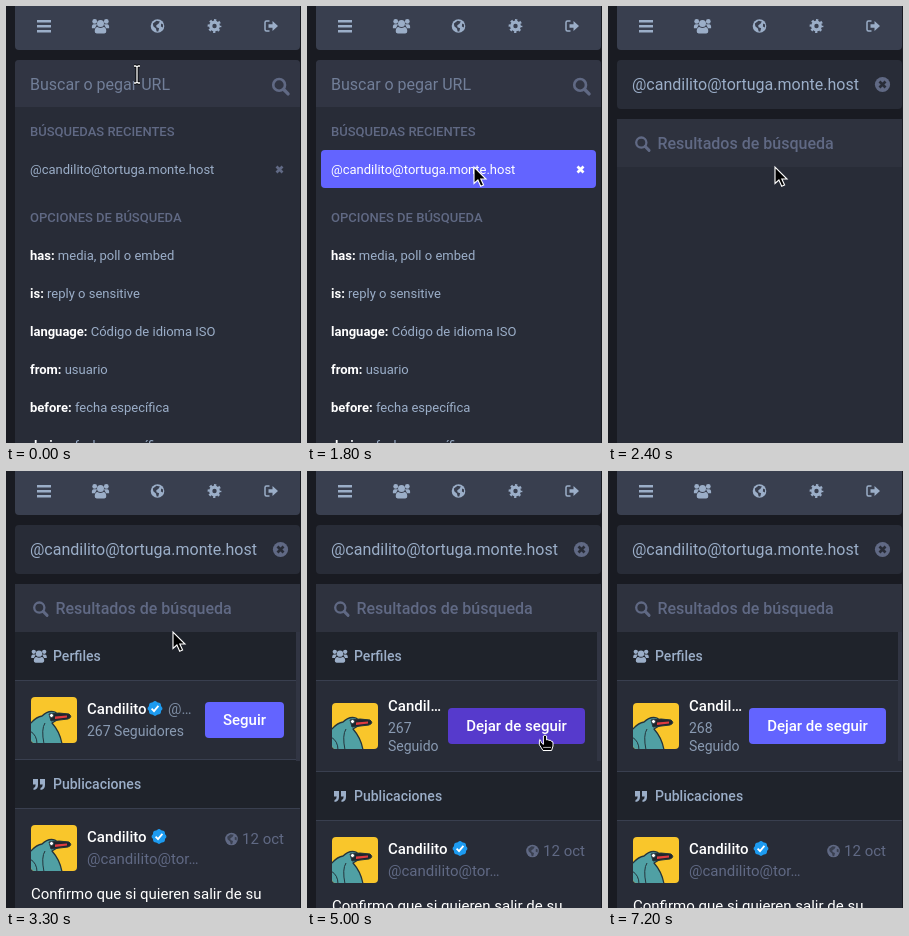
An HTML page for the animation above (7400 ms loop, 295 by 437 pixels).

```html
<!DOCTYPE html>
<html lang="es">
<head>
<meta charset="utf-8">
<title>Búsqueda</title>
<style>
html, body { margin: 0; height: 100%; overflow: hidden; background: #191b22; }
svg { display: block; width: 100vw; height: 100vh; font: 15px Roboto, sans-serif; }
text { white-space: pre; fill: currentColor; }
use { fill: currentColor; stroke: none; }
.line { fill: none; stroke: currentColor; }
.soft { color: #9baec8; }
.dim { color: #606984; }
.white { color: #fff; }
.s13 { font-size: 13px; }
.s14 { font-size: 14px; }
.s16 { font-size: 16px; }
.mid { font-weight: 500; }
.bold { font-weight: 700; fill: #fff; }
.center { text-anchor: middle; }
</style>
</head>
<body>
<svg viewBox="0 0 295 437">
  <defs>
    <g id="users">
      <circle cx="-5.8" cy="-4.6" r="2.4"/><circle cx="5.8" cy="-4.6" r="2.4"/>
      <path d="M-8.6 2.2Q-9-1.8-6.6-1.8H-3.4L-5.6 2.2ZM8.6 2.2Q9-1.8 6.6-1.8H3.4L5.6 2.2Z"/>
      <circle cy="-2.6" r="3.5"/>
      <path d="M-3.8 7.4Q-6 7.4-5.8 5Q-5.5 1-3 1Q0 2.8 3 1Q5.5 1 5.8 5Q6 7.4 3.8 7.4Z"/>
    </g>
    <g id="globe">
      <circle r="6.8"/>
      <path class="hole" d="M-1-5.2L2.4-4.6 1-2.2-1.2-.8-1 1.2 1.6 2.2.8 5.4-.8 5.6-1.6 2.6-4.2.2-4.6-2.4ZM3.6-2.4L5.6-1.6 5.4 1.6 3.4.6Z"/>
    </g>
    <g id="glass">
      <circle class="line" cx="-1.2" cy="-1.4" r="5.1" stroke-width="2.3"/>
      <path class="line" d="M2.6 2.4L6.6 6.4" stroke-width="2.9" stroke-linecap="round"/>
    </g>
    <g id="cross"><path class="line" d="M-3-3L3 3M3-3L-3 3" stroke-width="2.7"/></g>
    <g id="badge">
      <g fill="#1d9bf0"><rect x="-6" y="-6" width="12" height="12" rx="3"/><rect x="-6" y="-6" width="12" height="12" rx="3" transform="rotate(45)"/></g>
      <path d="M-3.4.2L-1 2.6 3.4-2.6" fill="none" stroke="#fff" stroke-width="1.8"/>
    </g>
    <clipPath id="round"><rect width="46" height="46" rx="4"/></clipPath>
    <g id="avatar" clip-path="url(#round)">
      <rect width="46" height="46" fill="#f9c62b"/>
      <g stroke="#24343c" stroke-linejoin="round">
        <path d="M-1 27Q5 20 11 19Q17 13 24 15Q29 18 26 23L21 26Q29 35 31 47H-1Z" fill="#50a0a4" stroke-width="1.3"/>
        <path d="M14 26Q10 32 13 47M-1 34Q6 38 6 47" fill="none"/>
        <path d="M18 17Q28 15 38 17Q42 20 37 22L20 24Z" fill="#20262c"/>
        <path d="M24 19.5L36 18.5V20.5L24 22Z" fill="#df3b3f" stroke="none"/>
        <circle cx="20.5" cy="18.5" r="2" fill="#fff" stroke-width=".8"/>
      </g>
    </g>
    <clipPath id="drawer"><rect x="9" y="113" width="285" height="324"/></clipPath>
    <clipPath id="count"><rect x="81" y="245" width="50.5" height="45"/></clipPath>
    <g id="arrow" fill="#000" stroke="#fff" stroke-width="1.1"><path d="M0 0V16.5L3.9 13 6.7 19.3 9.6 18 6.8 12H12Z"/></g>
    <g id="beam" fill="none">
      <path id="bar" d="M-3-8H-1.2L0-7 1.2-8H3M0-7V8M-3 9H-1.2L0 8 1.2 9H3" stroke="#000" stroke-width="3"/>
      <use href="#bar" style="stroke:none"/>
      <path d="M-3-8H-1.2L0-7 1.2-8H3M0-7V8M-3 9H-1.2L0 8 1.2 9H3" stroke="#fff" stroke-width="1.3"/>
    </g>
    <g id="hand" fill="#000" stroke="#fff" stroke-width="1">
      <path d="M-1.6 1Q0-1 1.6 1V5Q3 4 4 5.4Q5.6 4.6 6.2 6.2Q8 5.8 8 8V11L6.6 15.5H-2L-5.6 9.8Q-6-.2-3.4 8L-1.6 9.4Z"/>
      <path d="M-1.8 12.4H6" stroke-width=".7"/>
    </g>
  </defs>
  <style>
    .hole { fill: #393f4f; }
    #date .hole { fill: #282c37; }
    #beam use { display: none; }
  </style>

  <rect width="295" height="437" fill="#191b22"/>
  <path d="M9 0H294V40Q294 44 290 44H13Q9 44 9 40Z" fill="#393f4f"/>
  <g class="soft">
    <path class="line" d="M31 15.2H45M31 20.2H45M31 25.2H45" stroke-width="2.4"/>
    <use href="#users" x="94.5" y="20"/>
    <use href="#globe" x="151.5" y="20"/>
    <g class="line" transform="translate(208.5 20)">
      <circle r="3.8" stroke-width="3.2"/><circle r="5.8" stroke-width="2.2" stroke-dasharray="2.278" stroke-dashoffset="1.139"/>
    </g>
    <path class="line" d="M263.5 15H260.5Q259 15 259 16.5V23.5Q259 25 260.5 25H263.5" stroke-width="1.5"/>
    <path d="M262.5 18.3H266.5V15L272 20 266.5 25V21.7H262.5Z" fill="currentColor"/>
  </g>

  <g id="popout">
    <rect x="9" y="54" width="285" height="390" rx="4" fill="#282c37"/>
    <path d="M9 101V58Q9 54 13 54H290Q294 54 294 58V101Z" fill="#313543"/>
    <text class="s16" x="24" y="84" style="fill:#717e98">Buscar o pegar URL</text>
    <rect id="caret" x="24" y="69" width="1" height="19" fill="#9baec8"/>
    <use class="dim" href="#glass" transform="translate(274.5 80.5) scale(1.15)"/>
    <g class="dim s13 mid">
      <text x="24" y="130">BÚSQUEDAS RECIENTES</text>
      <text x="24" y="216">OPCIONES DE BÚSQUEDA</text>
    </g>
    <rect id="hover" x="14" y="144" width="275" height="38" rx="4" fill="#6364ff"/>
    <g id="recent">
      <text class="s13" x="24" y="168">@candilito@tortuga.monte.host</text>
      <use id="remove" href="#cross" x="273.5" y="163.5"/>
    </g>
    <g id="options" class="soft s13"></g>
  </g>

  <g id="results">
    <rect x="9" y="54" width="285" height="49" rx="4" fill="#282c37"/>
    <text class="s16 soft" x="24" y="84">@candilito@tortuga.monte.host</text>
    <circle cx="274.5" cy="78.5" r="7.6" fill="#606984"/>
    <use href="#cross" x="274.5" y="78.5" color="#282c37"/>
    <g clip-path="url(#drawer)">
      <rect x="9" y="113" width="285" height="324" fill="#444b5d"/>
      <g id="panel">
        <rect x="9" y="113" width="285" height="324" fill="#282c37"/>
        <rect x="9" y="113" width="285" height="48" fill="#2e323e"/>
        <use class="dim" href="#glass" x="34.5" y="138"/>
        <text class="dim s16 mid" x="49.5" y="143">Resultados de búsqueda</text>
        <g id="found">
          <rect x="9" y="161" width="285" height="48" fill="#1f232b"/>
          <rect x="9" y="209" width="285" height="1" fill="#393f4f"/>
          <g class="soft mid s14">
            <use href="#users" transform="translate(33 185) scale(.9)"/>
            <text x="47" y="190">Perfiles</text>
          </g>
          <g id="before">
            <use class="pic" href="#avatar" x="25" y="226"/>
            <text class="mid white" x="81" y="243">Candilito</text>
            <use class="tick" href="#badge" x="149" y="237.5"/>
            <text class="soft" x="162" y="243" opacity=".75">@…</text>
            <text class="soft s14" x="81" y="265" opacity=".85">267 Seguidores</text>
          </g>
          <g id="after">
            <use href="#avatar" x="25" y="232"/>
            <text class="mid white" x="81" y="240">Candil…</text>
            <g class="soft s14" clip-path="url(#count)" opacity=".85">
              <text id="followers" x="81" y="262">267</text>
              <text x="81" y="280">Seguidores</text>
            </g>
          </g>
          <rect id="button" height="36" rx="4"/>
          <text id="label" class="mid white center"></text>
          <g id="posts">
            <rect x="9" y="288" width="285" height="50" fill="#393f4f"/>
            <rect x="9" y="289" width="285" height="48" fill="#1f232b"/>
            <g class="soft">
              <path d="M27 308H32V314Q32 318.5 27.5 319V317Q29.7 316.5 29.7 313.5H27ZM34 308H39V314Q39 318.5 34.5 319V317Q36.7 316.5 36.7 313.5H34Z" fill="currentColor"/>
              <text class="mid s14" x="47" y="318">Publicaciones</text>
            </g>
            <rect x="9" y="338" width="285" height="110" fill="#282c37"/>
            <use class="pic" href="#avatar" x="25" y="354"/>
            <text class="mid white" x="81" y="371">Candilito</text>
            <use class="tick" href="#badge" x="153" y="365.5"/>
            <text class="dim" x="81" y="393">@candilito@tor…</text>
            <g id="date" class="dim">
              <use href="#globe" transform="translate(225.5 368) scale(.93)"/>
              <text x="278" y="373" text-anchor="end">12 oct</text>
            </g>
            <text class="white" x="25" y="428">Confirmo que si quieren salir de su</text>
          </g>
          <rect x="290" y="161" width="4" height="129" fill="#313543"/>
        </g>
      </g>
    </g>
  </g>
  <use id="cursor"/>
</svg>
<script>
const $ = id => document.getElementById(id);
const show = (el, on) => el.style.display = on ? '' : 'none';
const set = (el, attrs) => { for (const k in attrs) el.setAttribute(k, attrs[k]); };
const clamp = v => Math.max(0, Math.min(1, v));
const ease = p => p * p * (3 - 2 * p);

$('options').innerHTML = [
  ['has', 'media, poll o embed'], ['is', 'reply o sensitive'], ['language', 'Código de idioma ISO'],
  ['from', 'usuario'], ['before', 'fecha específica'], ['during', 'fecha específica']
].map(([key, hint], i) =>
  `<text x="24" y="${254 + 38 * i}"><tspan class="bold">${key}:</tspan> ${hint}</text>`).join('');

const mix = (a, b, p) => [a, a + (b - a) * p];

// Pointer moves: start, duration, from, to, easing
const moves = [
  [900, 700, [131, 68], [167, 161], ease],
  [3600, 700, [167, 161], [238, 264], ease],
  [5900, 400, [238, 264], [48, -86], p => p]
];
function pointer(t) {
  const [start, span, a, b, curve] = moves.findLast(m => t >= m[0]) || moves[0];
  const p = curve(clamp((t - start) / span));
  return a.map((v, i) => v + (b[i] - v) * p);
}

// Damped spring from 1 to 0: stiffness 210, damping 20
function spring(s) {
  const w = Math.sqrt(110);
  return Math.exp(-10 * s) * (Math.cos(w * s) + 10 / w * Math.sin(w * s));
}

function draw(t) {
  const [x, y] = pointer(t);
  const searching = t < 1900, followed = t >= 5000;

  show($('popout'), searching);
  show($('results'), !searching);
  show($('caret'), t >= 400 && t < 1000);
  const onRow = y >= 144;
  show($('hover'), onRow);
  $('recent').style.color = onRow ? '#fff' : '#9baec8';
  $('remove').style.color = onRow ? '#fff' : '#606984';

  const slide = t < 2400 ? -285 * spring((t - 1800) / 1000) : 0;
  set($('panel'), { transform: `translate(${slide} 0)` });
  show($('found'), t >= 3100);
  document.querySelectorAll('.pic').forEach(el => show(el, t >= 3200));
  document.querySelectorAll('.tick').forEach(el => show(el, t >= 3300));

  show($('before'), !followed);
  show($('after'), followed);
  $('followers').textContent = t < 5300 ? 267 : 268;
  set($('posts'), { transform: `translate(0 ${followed ? 12 : 0})` });

  const left = followed ? 141 : 199, top = followed ? 237 : 231;
  const onButton = t >= 3600 && x >= left && x <= 278 && y >= top && y <= top + 36;
  const active = followed ? t < 7200 : onButton;
  set($('button'), { x: left, y: top, width: 278 - left, fill: active ? '#563acc' : '#6364ff' });
  set($('label'), { x: (left + 278) / 2, y: top + 23 });
  $('label').textContent = followed ? 'Dejar de seguir' : 'Seguir';

  const shape = onButton || y < 44 ? 'hand' : y > 54 && y < 103 ? 'beam' : 'arrow';
  set($('cursor'), { href: '#' + shape, x: Math.round(x), y: Math.round(y) });
}

const begin = performance.now();
function tick() {
  const t = (performance.now() - begin) % 7400;
  draw(Math.floor(t / 100) * 100);
  requestAnimationFrame(tick);
}
tick();
</script>
</body>
</html>
```
